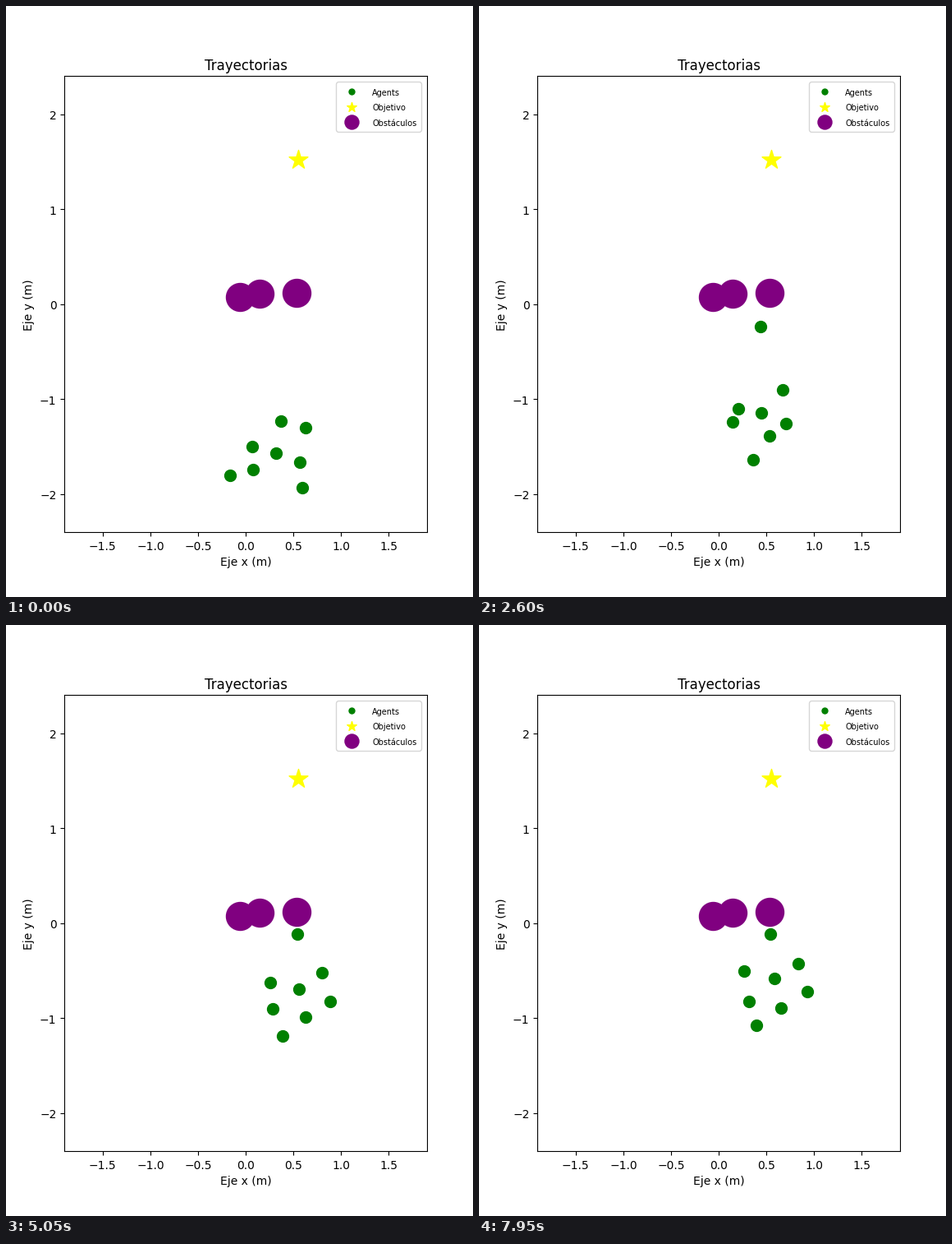
Write a matplotlib script that moves like this. It is 569 px wide and 719 px high and loops after 8 s.

```python
import numpy as np
import matplotlib.pyplot as plt
from matplotlib.animation import FuncAnimation
from matplotlib.transforms import Affine2D

W, H, DPI = 569, 719, 100
STEP, FRAMES = 50, 160
LEFT, BOTTOM, WIDTH, HEIGHT = 71.24, 79.2, 441.75, 554.4
X_MAX, Y_MAX = 1.9, 2.4

GATHER, END = 2.05, 7.95          # seconds
LEADER_RATE, RATE = 2.5, 0.6      # settling speed per second
SWELL, SWELL_AT, SWELL_SPAN = 0.55, 1.15, 0.28

# Screen positions of the agents, leader first: scattered, gathered, settled.
START = np.array([(273, 571), (365, 513), (301, 564), (335, 505),
                  (300, 536), (329, 544), (358, 555), (361, 586)])
GATHERED = np.array([(309, 433), (362, 489), (338, 522), (313, 518),
                     (301, 525), (364, 533), (348, 546), (333, 579)])
SETTLED = np.array([(355, 376), (389, 412), (360, 430), (323, 421),
                    (329, 458), (400, 446), (368, 466), (338, 487)])
RATES = np.array([LEADER_RATE] + [RATE] * 7)[:, None]

OBSTACLES = [(285, 354), (309, 350), (354, 349)]
GOAL = [(356, 187)]


def to_data(points):
    """Screen pixels (origin top left) to axes units."""
    px, py = np.asarray(points, dtype=float).T
    x = ((px - LEFT) / WIDTH * 2 - 1) * X_MAX
    y = ((H - py - BOTTOM) / HEIGHT * 2 - 1) * Y_MAX
    return np.column_stack([x, y])


def swarm(t):
    """Gather while swelling once, then settle exponentially."""
    if t < GATHER:
        pos = START + (GATHERED - START) * t / GATHER
        swell = SWELL * np.exp(-((t - SWELL_AT) / SWELL_SPAN) ** 2)
        return pos + swell * (pos - pos.mean(axis=0))
    rest = np.exp(-RATES * (END - GATHER))
    left = (np.exp(-RATES * (t - GATHER)) - rest) / (1 - rest)
    return SETTLED + (GATHERED - SETTLED) * left


# The small surplus keeps the pixel size from rounding down.
fw, fh = W + 0.01, H + 0.01
fig = plt.figure(figsize=(fw / DPI, fh / DPI), dpi=DPI, facecolor="white")
ax = fig.add_axes([LEFT / fw, BOTTOM / fh, WIDTH / fw, HEIGHT / fh])
ax.set_xlim(-X_MAX, X_MAX)
ax.set_ylim(-Y_MAX, Y_MAX)
ax.set_xticks(np.arange(-1.5, 1.6, 0.5))
ax.set_yticks(np.arange(-2, 3))
ax.set_title("Trayectorias")
ax.set_xlabel("Eje x (m)")
ax.set_ylabel("Eje y (m)")


def dots(points, **style):
    return ax.scatter(*to_data(points).T, **style)


agents = dots(START, s=100, color="green", label="Agents")
dots(GOAL, s=300, color="yellow", marker="*", label="Objetivo")
dots(OBSTACLES, s=600, color="purple", label="Obstáculos")

legend = ax.legend(loc="upper right", fontsize=10, markerscale=0.5)
plt.setp(legend.get_texts(), fontsize=7)

# Text sits one pixel lower than the shapes.
drop = Affine2D().translate(0, -1)
for text in (ax.get_xticklabels() + ax.get_yticklabels()
             + legend.get_texts() + [ax.title, ax.yaxis.label]):
    text.set_transform(text.get_transform() + drop)


def update(i):
    agents.set_offsets(to_data(swarm(i * STEP / 1000)))
    return agents,


anim = FuncAnimation(fig, update, frames=FRAMES, interval=STEP,
                     repeat=True, repeat_delay=0, blit=False)
plt.show()
```
